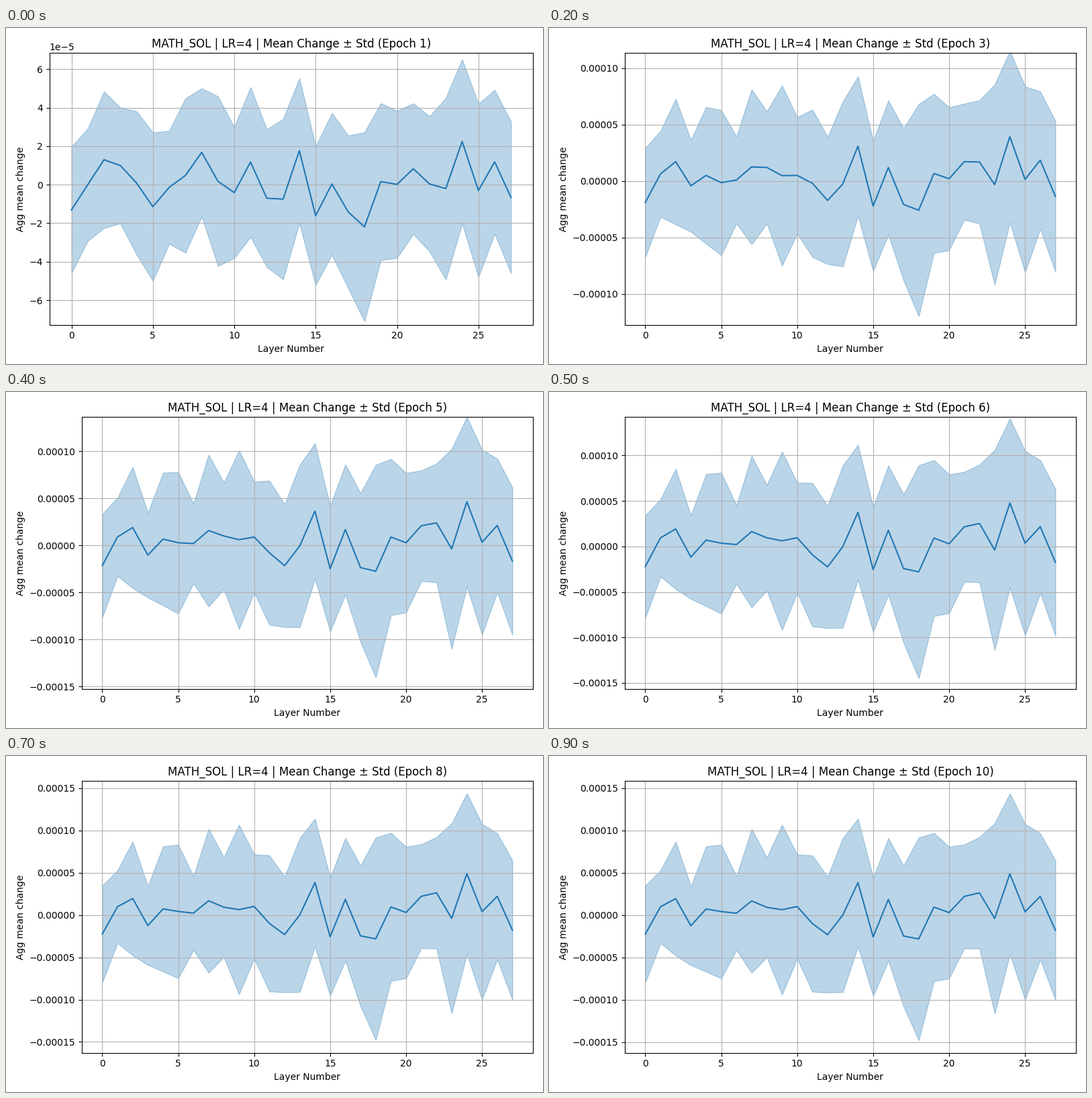
A matplotlib script for the animation above (1000 ms loop, 800 px wide and 500 px high).

```python
import numpy as np
import matplotlib.pyplot as plt
from matplotlib.animation import FuncAnimation

EPOCHS = 10
INTERVAL = 100  # ms per epoch
MICRO = 1e-6

# Mean change per layer at the start and end of training, and the final spread.
START_MEAN = np.array([
    -13.1, 0, 13, 10, 0.9, -11.4, -1.4, 4.8, 16.8, 1.8, -4.1, 11.8, -7, -7.5,
    17.7, -16.1, 0.4, -14.1, -21.9, 1.6, 0.2, 8.3, 0.4, -2, 22.5, -3, 11.9, -6.6])
FINAL_MEAN = np.array([
    -22.5, 9.8, 19.5, -12.6, 7.2, 4.2, 2.2, 16.8, 9.2, 6.4, 10.1, -10, -23.2, 0,
    38.4, -25.8, 18.5, -24.7, -28.2, 9.5, 3, 22.1, 26.3, -4, 48.8, 3.9, 22.1, -18])
FINAL_STD = np.array([
    57.3, 43, 67.3, 46.6, 74, 79, 43.7, 85, 59, 100.3, 61.6, 80.5, 68.3, 91,
    75.6, 69.8, 72.5, 83.2, 119.8, 87.5, 77.8, 61.4, 65.9, 112.5, 95, 103.8, 74.5, 82.5])

# The spread starts out smaller and more even across the layers.
START_STD = 18 + 0.26 * FINAL_STD

# Extent of the plotted band as training goes on.
KEY_EPOCHS = [1, 2, 3, 5, 7, 8, 10]
HIGHS = [62, 88.9, 102.3, 123.1, 134.1, 143.6, 143.8]
LOWS = [-66.4, -100.2, -116.5, -139.4, -146.5, -148.3, -148.2]


def blend(start, end, amount):
    return start + (end - start) * amount


def progress(epoch):
    """Quartic ease-out over the whole training run."""
    return 1 - (1 - (epoch - 1) / (EPOCHS - 1)) ** 4


def y_limits(epoch, margin=0.05):
    low = np.interp(epoch, KEY_EPOCHS, LOWS)
    high = np.interp(epoch, KEY_EPOCHS, HIGHS)
    pad = margin * (high - low)
    return (low - pad) * MICRO, (high + pad) * MICRO


fig = plt.figure(figsize=(8, 5), dpi=100)


def draw(frame):
    epoch = frame + 1
    amount = progress(epoch)
    mean = blend(START_MEAN, FINAL_MEAN, amount) * MICRO
    std = blend(START_STD, FINAL_STD, amount) * MICRO
    layers = np.arange(len(mean))

    # A fresh axes lets ticks and margins follow each epoch's limits.
    fig.clf()
    ax = fig.add_subplot()
    ax.plot(layers, mean, color="tab:blue")
    ax.fill_between(layers, mean - std, mean + std, color="tab:blue", alpha=0.3)
    ax.set_ylim(*y_limits(epoch))
    ax.set_title(f"MATH_SOL | LR=4 | Mean Change ± Std (Epoch {epoch})")
    ax.set_xlabel("Layer Number")
    ax.set_ylabel("Agg mean change")
    ax.grid(True)
    fig.tight_layout()
    return []


anim = FuncAnimation(fig, draw, frames=EPOCHS, init_func=lambda: [],
                     interval=INTERVAL, repeat=True, repeat_delay=0)
plt.show()
```
